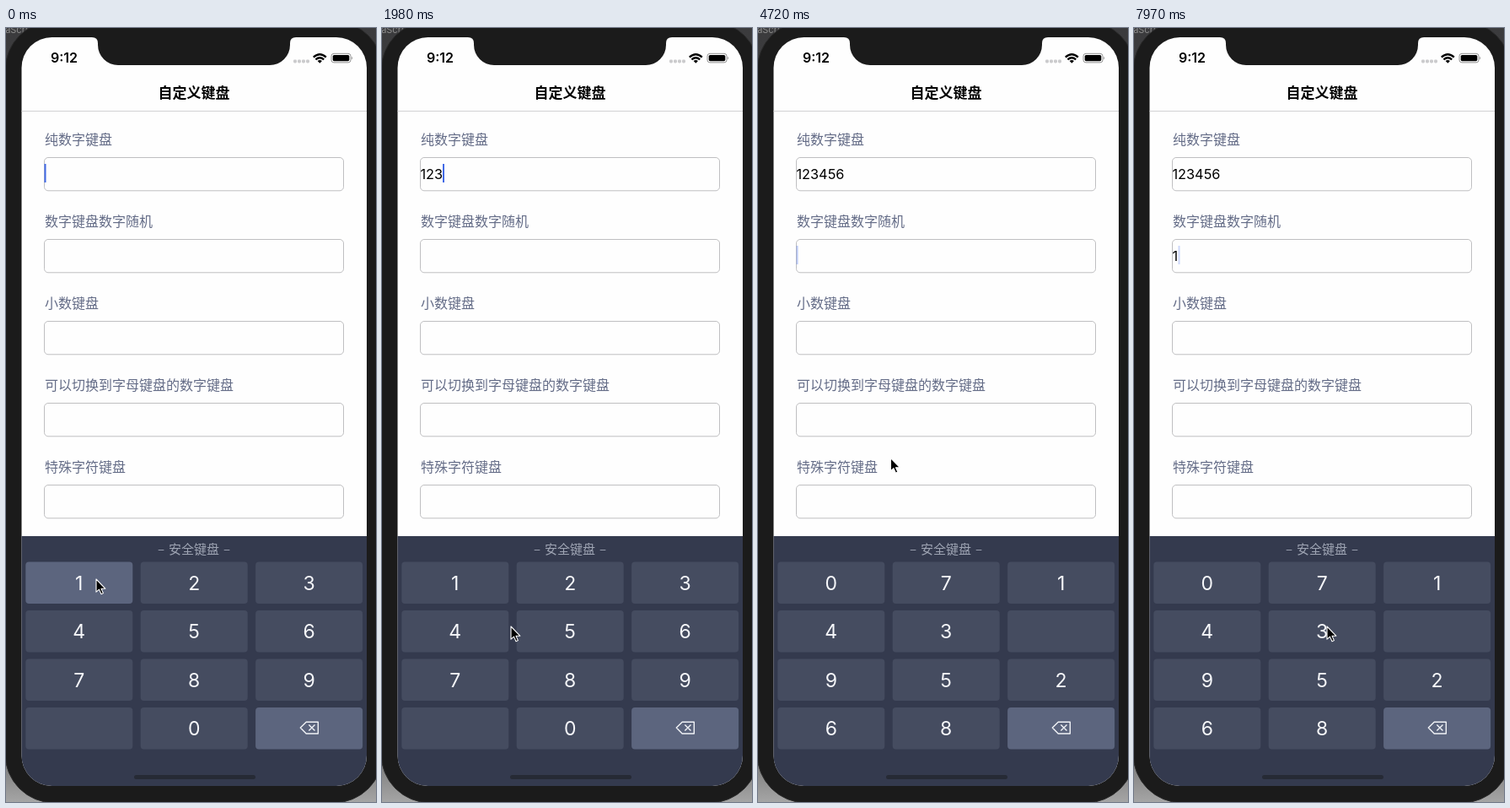
Animation of 439 by 917 pixels, one loop 8 s. Source, as an HTML page:

```html
<!DOCTYPE html>
<html lang="zh-CN">
<head>
<meta charset="utf-8">
<title>自定义键盘</title>
<style>
  html, body { margin: 0; width: 100%; height: 100%; overflow: hidden; background: #1b1b1b; }
  svg { display: block; width: 439px; height: 917px; }
  text { font-family: Inter, "Noto Sans CJK SC", "Noto Sans CJK", sans-serif; white-space: pre; }
  .cjk { font-family: "Noto Sans CJK SC", "Noto Sans CJK", sans-serif; }
  .mid { text-anchor: middle; }
</style>
</head>
<body>
<svg id="stage" viewBox="0 0 439 917">
  <defs>
    <linearGradient id="desk" x2="0" y2="1">
      <stop offset="0" stop-color="#3b3b3d"/>
      <stop offset=".9" stop-color="#555"/>
      <stop offset="1" stop-color="#a5a5a5"/>
    </linearGradient>
    <clipPath id="screen"><rect x="18.5" y="11" width="409.5" height="887" rx="36"/></clipPath>
  </defs>
  <rect width="439" height="917" fill="url(#desk)"/>
  <text x="-7" y="6" font-size="11" fill="#8c8c8c">vaScri</text>
  <rect x="-1" y="-8" width="448" height="926" rx="58" fill="#1b1b1b" stroke="#2b2b2b"/>
  <g clip-path="url(#screen)">
    <rect x="18" y="11" width="411" height="888" fill="#fefefe"/>
    <path d="M18 98.5H428" stroke="#d2d2d4"/>
    <g id="form"></g>
    <rect x="18" y="602" width="411" height="297" fill="#343a4e"/>
    <text class="cjk mid" x="223" y="623" font-size="15" word-spacing="1.6" fill="#9ea4b3">– 安全键盘 –</text>
    <g id="keys"></g>
    <rect x="152" y="885" width="144" height="5" rx="2.5" fill="#262a35"/>
  </g>
  <path d="M102 10V11Q109 11 109 18V20A24 24 0 0 0 133 44H313A24 24 0 0 0 337 20V18Q337 11 344 11V10Z" fill="#1b1b1b"/>
  <text x="53" y="41" font-size="16" font-weight="600">9:12</text>
  <text class="cjk mid" x="223" y="82.5" font-size="17" font-weight="700">自定义键盘</text>
  <g id="dots" fill="#cbcbcd"></g>
  <g fill="none" stroke="#000" stroke-width="2.3">
    <path d="M364.8 34.6Q372.3 27.8 379.8 34.6M367.4 37.4Q372.3 33.2 377.2 37.4"/>
  </g>
  <path d="M369.6 39Q372.3 36.9 375 39L372.3 41.8Z"/>
  <rect x="386" y="30.3" width="23" height="10.6" rx="3" fill="none" stroke="#929292"/>
  <rect x="387.7" y="32" width="19.6" height="7.2" rx="1.6"/>
  <path d="M410.2 33.8Q412.2 35.6 410.2 37.4Z" fill="#929292"/>
  <path id="pointer" d="M0 0V15.2L3.5 12.1L6 17.7L8.4 16.6L6 11.2H10.8Z" stroke="#fff" stroke-width="1.1" stroke-linejoin="round"/>
</svg>
<script>
const LOOP = 8000;
const LABELS = ['纯数字键盘', '数字键盘数字随机', '小数键盘', '可以切换到字母键盘的数字键盘', '特殊字符键盘'];
const ORDERED = [...'123456789', '', '0'];
const SHUFFLED = [...'07143', '', ...'95268'];
const SHUFFLE_AT = 4120;
const FIELD_STEP = 97;
const CARET_X = [45.5, 52.5, 62, 72, 82, 92.5, 103];

// time, field, its text
const EDITS = [
  [0, 0, ''], [150, 0, '1'], [740, 0, '12'], [1450, 0, '123'], [2280, 0, '1234'],
  [2830, 0, '12345'], [3210, 0, '123456'], [SHUFFLE_AT, 1, ''], [6300, 1, '1']
];
// down, up, key
const PRESSES = [
  [0, 150, 0], [610, 740, 1], [1300, 1450, 2], [2160, 2280, 3],
  [2620, 2830, 4], [3060, 3210, 5], [6120, 6300, 2]
];
// time, x, y
const PATH = [
  [0, 107, 653], [230, 107, 653], [560, 219, 645], [890, 219, 645], [1150, 326, 648],
  [1540, 326, 648], [1980, 153, 709], [2090, 118, 710], [2300, 118, 710], [2560, 228, 712],
  [2830, 228, 712], [3030, 348, 711], [3210, 348, 711], [3410, 135, 337], [3570, 135, 337],
  [3880, 100, 265], [4450, 100, 265], [4960, 205, 712], [5220, 262, 662], [5820, 330, 661],
  [6360, 330, 661], [6910, 166, 748], [7060, 167, 743], [7150, 167, 743], [7730, 258, 740],
  [7820, 252, 736], [7970, 229, 709], [8000, 229, 709]
];

const byId = id => document.getElementById(id);

function add(parent, tag, attrs, content = '') {
  const el = document.createElementNS('http://www.w3.org/2000/svg', tag);
  for (const name in attrs) el.setAttribute(name, attrs[name]);
  el.textContent = content;
  return parent.appendChild(el);
}

const form = byId('form');
const values = LABELS.map((label, i) => {
  const y = i * FIELD_STEP;
  add(form, 'text', { class: 'cjk', x: 46, y: 138 + y, 'font-size': 16, fill: '#646c87' }, label);
  add(form, 'rect', { x: 45.5, y: 153.5 + y, width: 355, height: 39.3, rx: 4.5, fill: 'none', stroke: '#bfbfc1' });
  return add(form, 'text', { x: 45.5, y: 178.5 + y, 'font-size': 16.3 });
});
const caret = add(form, 'rect', { width: 2, height: 22, fill: '#4169e6' });

const keysGroup = byId('keys');
const keys = Array.from({ length: 12 }, (_, i) => {
  const x = 23.3 + i % 3 * 136.4;
  const y = 632.5 + Math.floor(i / 3) * 57.5;
  return {
    face: add(keysGroup, 'rect', { x, y, width: 127, height: 49.5, rx: 4 }),
    digit: add(keysGroup, 'text', { class: 'mid', x: x + 63.5, y: y + 33, 'font-size': 23, fill: '#f6f7fa' })
  };
});
add(keysGroup, 'path', {
  d: 'M349.3 829L356.2 822.2H370.3V836H356.2ZM359.3 825.4L366.5 832.6M366.5 825.4L359.3 832.6',
  fill: 'none', stroke: '#f0f2f6', 'stroke-width': 1.4, 'stroke-linejoin': 'round'
});

for (let i = 0; i < 4; i++) add(byId('dots'), 'rect', { x: 341 + i * 5, y: 37.5, width: 4, height: 4, rx: 1.4 });

const clamp = v => Math.max(0, Math.min(1, v));

function pointerAt(t) {
  const i = PATH.findIndex(p => p[0] > t);
  const [t0, x0, y0] = PATH[i - 1];
  const [t1, x1, y1] = PATH[i];
  const u = (t - t0) / (t1 - t0);
  const k = u * u * (3 - 2 * u);
  return [x0 + (x1 - x0) * k, y0 + (y1 - y0) * k];
}

function caretOpacity(age) {
  const phase = age % 1060;
  return phase < 800 ? clamp((640 - phase) / 110) : clamp((phase - 940) / 120);
}

function render(t) {
  const texts = LABELS.map(() => '');
  let current;
  for (const edit of EDITS) {
    if (edit[0] > t) break;
    current = edit;
    texts[edit[1]] = edit[2];
  }
  values.forEach((el, i) => { el.textContent = texts[i]; });

  const [since, field, text] = current;
  caret.setAttribute('x', CARET_X[text.length]);
  caret.setAttribute('y', 161 + field * FIELD_STEP);
  caret.setAttribute('opacity', caretOpacity(t - since));

  const layout = t < SHUFFLE_AT ? ORDERED : SHUFFLED;
  const pressed = PRESSES.find(([down, up]) => t >= down && t < up);
  keys.forEach(({ face, digit }, i) => {
    const lit = i === 11 || (pressed && pressed[2] === i);
    face.setAttribute('fill', lit ? '#5c657e' : '#454c60');
    digit.textContent = layout[i] || '';
  });

  byId('pointer').setAttribute('transform', `translate(${pointerAt(t).join(' ')})`);
}

const start = performance.now();
function tick() {
  render((performance.now() - start) % LOOP);
  requestAnimationFrame(tick);
}
tick();
</script>
</body>
</html>
```
